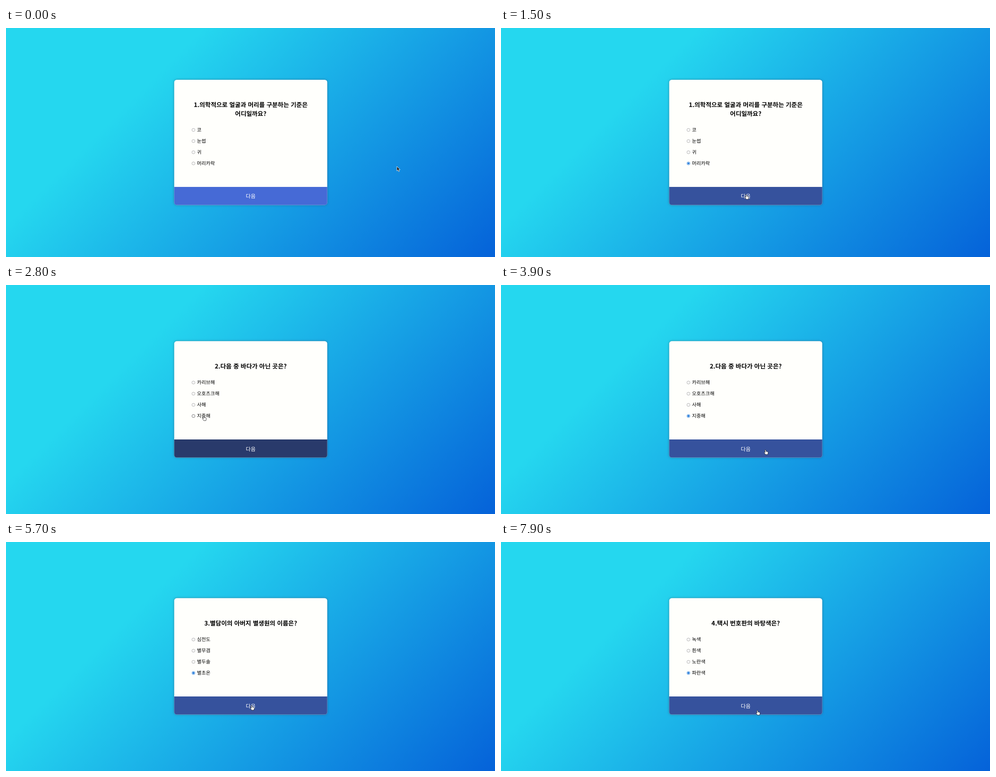
Recreate the animation shown at these times as an HTML page. Size 1091 by 513 pixels, loop 8000 ms.

```html
<!DOCTYPE html>
<html lang="ko">
<head>
<meta charset="utf-8">
<title>퀴즈</title>
<style>
  html, body { margin: 0; width: 100%; height: 100%; overflow: hidden; }
  body { background: linear-gradient(135deg, #25d7ef 27.5%, #0562d9 100%); }
  svg { display: block; width: 100%; height: 100%; }
  text { font-family: "Noto Sans CJK KR", "Noto Sans", sans-serif; text-rendering: geometricPrecision; }
  .card { fill: #fffffc; filter: drop-shadow(0 0 2.5px rgba(50, 60, 80, .5)); }
  .title { font-size: 13.66px; font-weight: 700; text-anchor: middle; }
  .option text { font-size: 10.92px; }
  .ring { fill: #fff; stroke: #767676; stroke-width: .6; }
  .dot { fill: #1a75d8; display: none; }
  .hover .ring { stroke: #3f3f3f; stroke-width: .75; }
  .pressed .ring { stroke: #8d8d8d; fill: #f3f3f3; }
  .checked .ring { stroke: #1a75d8; stroke-width: .8; }
  .checked .dot { display: inline; }
  .button { fill: #466ad6; }
  .button.hover { fill: #36529d; }
  .button.focus { fill: #293a6b; }
  .next { font-size: 11.83px; fill: #fff; text-anchor: middle; }
  #arrow { fill: #222; stroke: #fff; stroke-width: .8; }
  #hand { fill: #fff; stroke: #1c1c1c; stroke-width: .8; stroke-linejoin: round; }
</style>
</head>
<body>
<svg viewBox="0 0 1091 513">
  <g id="quiz"></g>
  <g id="cursor">
    <path id="arrow" d="M0 0V10.2L2.4 8 4 11.8 5.8 11 4.2 7.3H7.4Z"/>
    <path id="hand" d="M-1.2 .9Q0 -.7 1 .9L1.4 4Q3.6 3.6 5.6 5Q6.4 6 5.6 8L5 10.8H.2Q-1.5 8 -3 6.2Q-2.6 4.6 -.6 6.2Z"/>
  </g>
</svg>
<script>
const LOOP = 8000, STEP = 100;
const LEFT = 375.3, WIDTH = 341.4, CENTER = 546, MIDDLE = 256.2;
const LINE = 19.7, ROW = 25, BUTTON = 40.5, RADIUS = 5.7;

// focus, show: button pressed, question appears; press, check: last option
const questions = [
  { title: ['1.의학적으로 얼굴과 머리를 구분하는 기준은', '어디일까요?'],
    options: ['코', '눈썹', '귀', '머리카락'], show: 0, press: 1000, check: 1000, focus: 1700 },
  { title: ['2.다음 중 바다가 아닌 곳은?'],
    options: ['카리브해', '오호츠크해', '사해', '지중해'], show: 1800, press: 3200, check: 3400, focus: 4100 },
  { title: ['3.별담이의 아버지 별생원의 이름은?'],
    options: ['심전도', '별무겸', '별두솔', '별초온'], show: 4200, press: 5100, check: 5300, focus: 6100 },
  { title: ['4.택시 번호판의 바탕색은?'],
    options: ['녹색', '흰색', '노란색', '파란색'], show: 6200, press: 7200, check: 7400, focus: LOOP }
];

// time, x, y of the pointer tip
const path = [
  [0, 872, 310], [100, 858, 314], [200, 858, 314], [700, 442, 300],
  [1100, 442, 300], [1500, 547, 373], [2000, 547, 373], [2300, 731, 350],
  [2700, 450, 287], [2800, 441, 293], [3300, 441, 293], [3500, 594, 311],
  [3600, 594, 311], [3900, 590, 369], [4200, 590, 369], [4700, 441, 290],
  [5500, 441, 290], [5700, 548, 366], [6200, 548, 366], [6700, 441, 290],
  [7400, 441, 290], [7700, 565, 443], [7900, 572, 377], [LOOP, 572, 377]
];

const $ = id => document.getElementById(id);
const quiz = $('quiz'), cursor = $('cursor'), arrow = $('arrow'), hand = $('hand');
let shown, button, rows;

function layout(q) {
  const height = 241.1 + LINE * q.title.length;
  const top = MIDDLE - height / 2, bottom = top + height;
  return { height, top, bottom, buttonTop: bottom - BUTTON, firstRow: bottom - 168.1 };
}

function build(q) {
  const { height, top, bottom, buttonTop, firstRow } = layout(q);
  const titles = q.title.map((s, i) =>
    `<text class="title" x="${CENTER}" y="${top + 61.2 + i * LINE}">${s}</text>`);
  const options = q.options.map((s, i) => {
    const y = firstRow + i * ROW;
    return `<g class="option"><circle class="ring" cx="418.2" cy="${y}" r="3.4"/>
      <circle class="dot" cx="418.2" cy="${y}" r="2.15"/>
      <text x="426" y="${y + 3.6}">${s}</text></g>`;
  });
  quiz.innerHTML = `
    <rect class="card" x="${LEFT}" y="${top}" width="${WIDTH}" height="${height}" rx="${RADIUS}"/>
    ${titles.join('')}${options.join('')}
    <path class="button" d="M${LEFT} ${buttonTop}h${WIDTH}V${bottom - RADIUS}
      a${RADIUS} ${RADIUS} 0 0 1 ${-RADIUS} ${RADIUS}H${LEFT + RADIUS}
      a${RADIUS} ${RADIUS} 0 0 1 ${-RADIUS} ${-RADIUS}Z"/>
    <text class="next" x="${CENTER}" y="${bottom - 15}">다음</text>`;
  button = quiz.querySelector('.button');
  rows = [...quiz.querySelectorAll('.option')];
  shown = q;
}

function pointerAt(t) {
  const i = path.findIndex(p => p[0] > t);
  const [t0, x0, y0] = path[i - 1], [t1, x1, y1] = path[i];
  const u = (t - t0) / (t1 - t0), k = u * u * (3 - 2 * u);
  return [x0 + (x1 - x0) * k, y0 + (y1 - y0) * k];
}

function draw(t) {
  const index = questions.findLastIndex(q => t >= q.show);
  const q = questions[index];
  if (q !== shown) build(q);

  const [x, y] = pointerAt(t);
  const { bottom, buttonTop, firstRow } = layout(q);
  const onButton = x > LEFT && x < LEFT + WIDTH && y > buttonTop && y < bottom;
  const focused = t >= q.focus || (index > 0 && t < q.press);
  button.classList.toggle('hover', onButton);
  button.classList.toggle('focus', focused);

  let onLabel = false;
  rows.forEach((row, i) => {
    const hover = x > 414 && x < 426 + q.options[i].length * 10
      && Math.abs(y - firstRow - i * ROW) < 8;
    const last = i === rows.length - 1;
    onLabel = onLabel || hover;
    row.classList.toggle('hover', hover);
    row.classList.toggle('pressed', last && t >= q.press && t < q.check);
    row.classList.toggle('checked', last && t >= q.check);
  });

  const pointing = onButton || onLabel;
  hand.style.display = pointing ? '' : 'none';
  arrow.style.display = pointing ? 'none' : '';
  cursor.setAttribute('transform', `translate(${x} ${y})`);
}

function frame() {
  const t = performance.now() % LOOP;
  draw(Math.floor(t / STEP) * STEP);
  requestAnimationFrame(frame);
}
frame();
</script>
</body>
</html>
```
